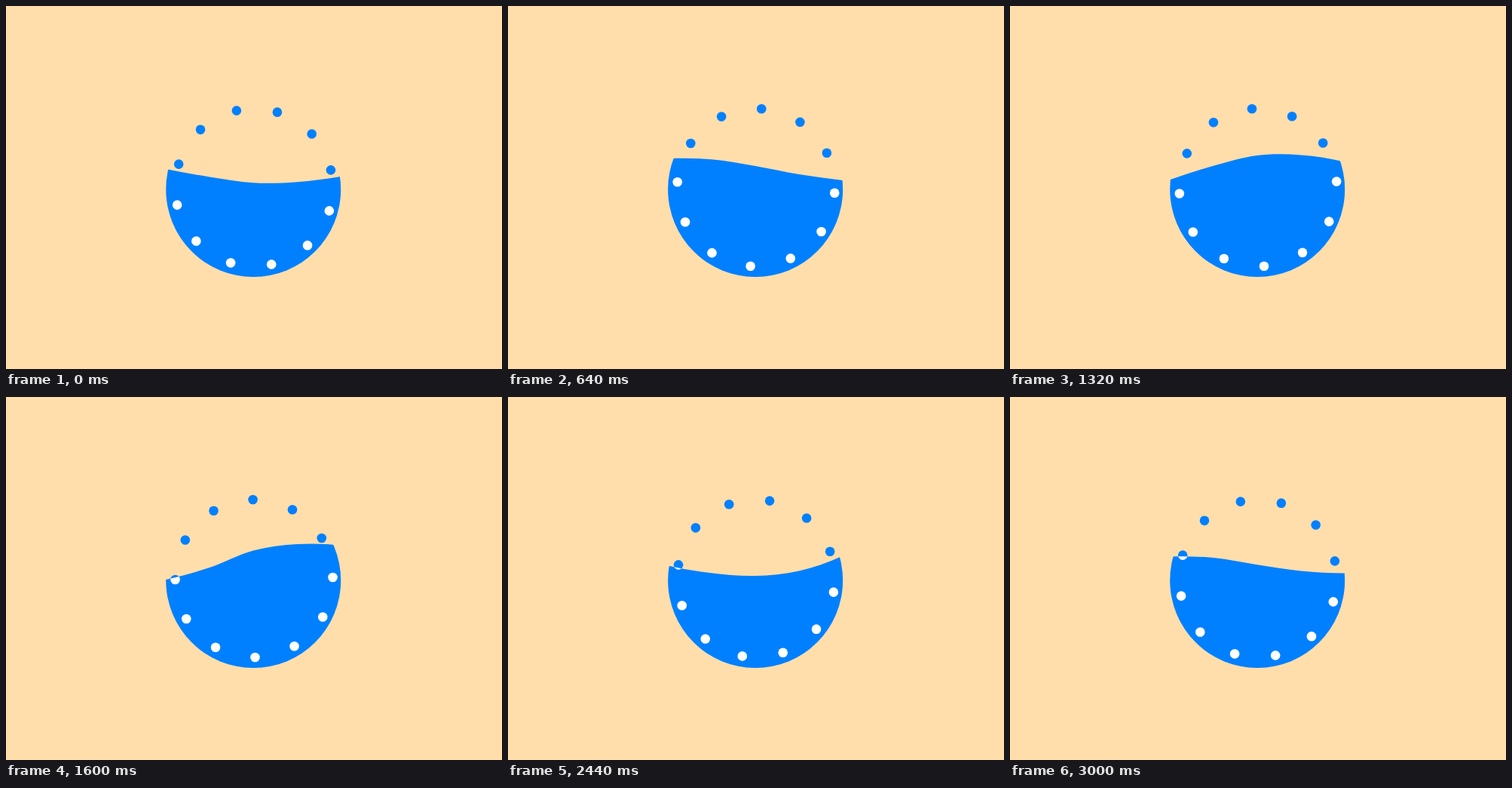
Animation of 658 by 481 pixels, one loop 3.04 s. Source, as an HTML page:

```html
<!DOCTYPE html>
<html lang="en">
<head>
<meta charset="utf-8">
<title>Water gauge</title>
<style>
  html, body { margin: 0; width: 100%; height: 100%; overflow: hidden; background: #ffdeab; }
  svg { display: block; width: 658px; height: 481px; }
</style>
</head>
<body>
<svg viewBox="0 0 658 481">
  <defs>
    <clipPath id="water"><path id="surface"/></clipPath>
    <g id="ring"></g>
  </defs>
  <use href="#ring" fill="#0080ff"/>
  <g clip-path="url(#water)">
    <circle cx="328.2" cy="243" r="116" fill="#0080ff"/>
    <use href="#ring" fill="#fff"/>
  </g>
</svg>
<script>
const LOOP = 3040, STEP = 40, TURN = 3000;
const DOTS = 12, RING_RADIUS = 104.5, DOT_RADIUS = 6.3, START_ANGLE = 17.2;
const LEFT = 212, GAP = 58;

// Water height at five evenly spaced points; the outer poses guide the ends of the loop.
const poses = [
  { t: -480, y: [235.5, 239.3, 235, 214.5, 194.8] },
  { t: 0,    y: [216, 226.5, 234.3, 233.2, 226] },
  { t: 640,  y: [202.2, 203.3, 212, 223, 231] },
  { t: 1040, y: [215.5, 200.5, 199.5, 206, 218.5] },
  { t: 1600, y: [242, 226, 203.5, 195, 196.5] },
  { t: 2120, y: [235.5, 239.3, 235, 214.5, 194.8] },
  { t: 2440, y: [223.5, 233.3, 237, 230.5, 210.5] },
  { t: 3000, y: [211.5, 213, 222.3, 230.5, 233.5] },
  { t: 3240, y: [202.2, 203.3, 212, 223, 231] }
];

const ring = document.getElementById("ring");
const surface = document.getElementById("surface");

const dots = Array.from({ length: DOTS }, () => {
  const dot = document.createElementNS("http://www.w3.org/2000/svg", "circle");
  dot.setAttribute("r", DOT_RADIUS);
  return ring.appendChild(dot);
});

function slope(k, i) {
  const [a, b, c] = poses.slice(k - 1, k + 2);
  const before = b.t - a.t, after = c.t - b.t;
  return ((b.y[i] - a.y[i]) / before * after + (c.y[i] - b.y[i]) / after * before) / (before + after);
}

function heights(t) {
  let k = 1;
  while (k < poses.length - 3 && t >= poses[k + 1].t) k++;
  const a = poses[k], b = poses[k + 1];
  const span = b.t - a.t, u = (t - a.t) / span, v = 1 - u;
  return a.y.map((y, i) =>
    v * v * (1 + 2 * u) * y + u * u * (1 + 2 * v) * b.y[i] +
    u * v * span * (v * slope(k, i) - u * slope(k + 1, i)));
}

function surfacePath(y) {
  const extend = (a, b, c) => 3 * a - 3 * b + c;
  const p = [extend(y[0], y[1], y[2]), ...y, extend(y[4], y[3], y[2])];
  let d = `M${LEFT} 370V${y[0]}`;
  for (let i = 1; i < 5; i++) {
    const x = LEFT + (i - 1) * GAP;
    const c1 = p[i] + (p[i + 1] - p[i - 1]) / 6;
    const c2 = p[i + 1] - (p[i + 2] - p[i]) / 6;
    d += `C${x + GAP / 3} ${c1} ${x + GAP * 2 / 3} ${c2} ${x + GAP} ${p[i + 1]}`;
  }
  return d + `H446V370Z`;
}

function draw(t) {
  dots.forEach((dot, i) => {
    const angle = (START_ANGLE + 360 * (t / TURN + i / DOTS)) * Math.PI / 180;
    dot.setAttribute("cx", 329 + RING_RADIUS * Math.sin(angle));
    dot.setAttribute("cy", 240.5 - RING_RADIUS * Math.cos(angle));
  });
  surface.setAttribute("d", surfacePath(heights(t)));
}

const start = performance.now();
function tick(now) {
  const elapsed = Math.max(0, now - start) % LOOP;
  draw(Math.floor(elapsed / STEP) * STEP);
  requestAnimationFrame(tick);
}
draw(0);
requestAnimationFrame(tick);
</script>
</body>
</html>
```
